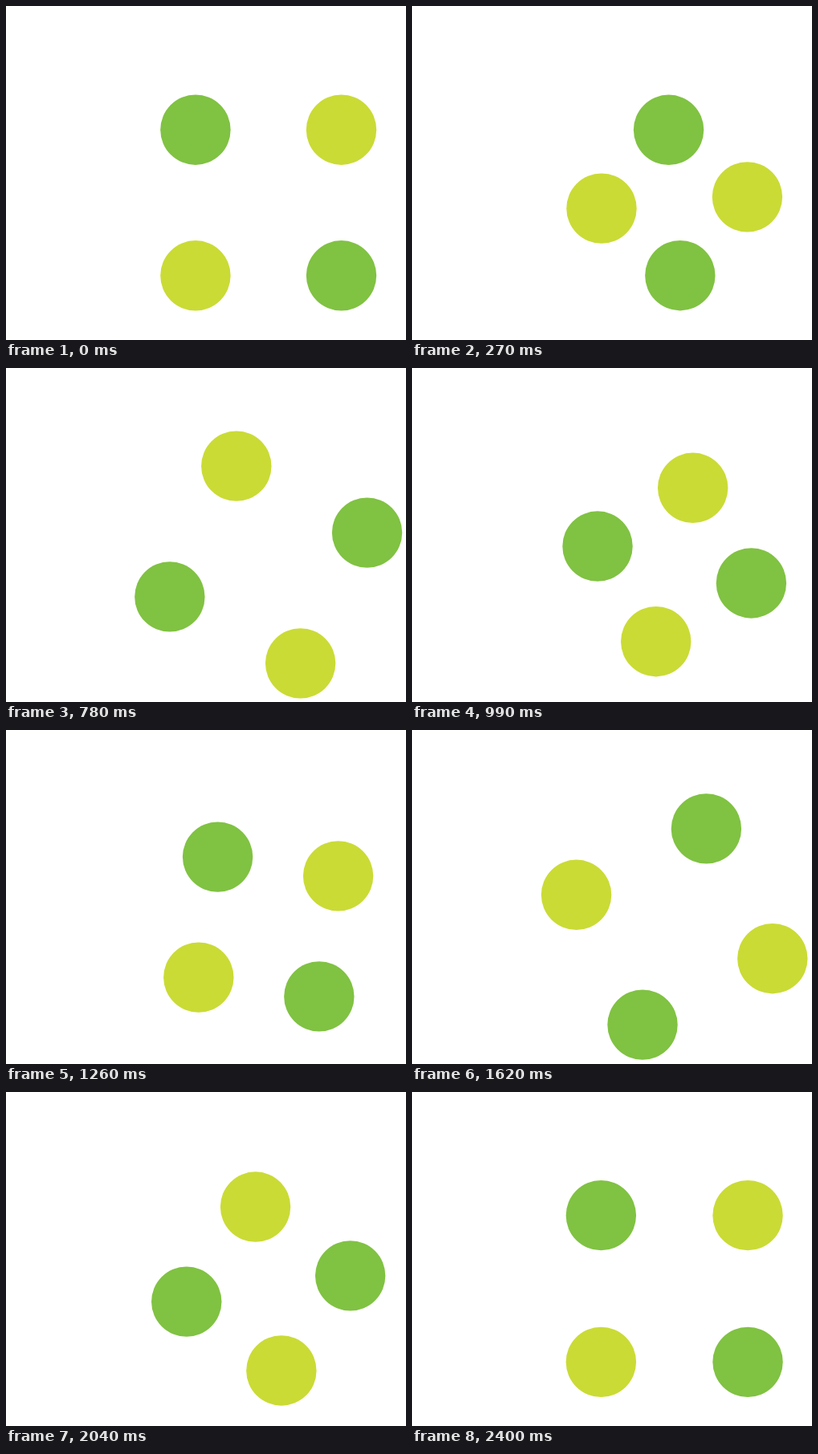
An HTML page that plays this animation: 498 px wide and 416 px high, repeating every 2.43 s.

```html
<!DOCTYPE html>
<html lang="en">
<head>
<meta charset="utf-8">
<title>Four orbiting dots</title>
<style>
  html, body { margin: 0; width: 100%; height: 100%; overflow: hidden; background: #fff; }
  svg { display: block; width: 498px; height: 416px; }
</style>
</head>
<body>
<svg id="stage" viewBox="0 0 498 416"></svg>
<script>
const STEP = 30, STEPS = 81, PULSE = 27;
const CENTER = { x: 326.7, y: 245 };
const DOT = 43.7;
const COLORS = ['#80c242', '#cadb35'];

// Orbit radius through one pulse, a knot every three steps.
const KNOTS = [128.4, 116.5, 98.4, 91, 95.3, 107.4, 117.4, 124.4, 127.6];
const GAP = PULSE / KNOTS.length;

const stage = document.getElementById('stage');
const dots = [0, 1, 2, 3].map(i => {
  const dot = document.createElementNS('http://www.w3.org/2000/svg', 'circle');
  dot.setAttribute('r', DOT);
  dot.setAttribute('fill', COLORS[i % 2]);
  return stage.appendChild(dot);
});

// Closed Catmull-Rom curve through the knots.
function orbit(step) {
  const u = (step % PULSE) / GAP, i = Math.floor(u), t = u - i;
  const at = k => KNOTS[(i + k + KNOTS.length) % KNOTS.length];
  const [a, b, c, d] = [at(-1), at(0), at(1), at(2)];
  return b + t / 2 * (c - a + t * (2 * a - 5 * b + 4 * c - d + t * (3 * (b - c) + d - a)));
}

function draw(step) {
  const r = orbit(step);
  const turn = step / (STEPS - 1) * 2 * Math.PI;
  dots.forEach((dot, i) => {
    const angle = turn + (i - 1.5) * Math.PI / 2;
    dot.setAttribute('cx', CENTER.x + r * Math.cos(angle));
    dot.setAttribute('cy', CENTER.y + r * Math.sin(angle));
  });
}

const start = performance.now();
function tick() {
  const elapsed = Math.max(0, performance.now() - start);
  draw(Math.floor(elapsed / STEP) % STEPS);
  requestAnimationFrame(tick);
}
draw(0);
requestAnimationFrame(tick);
</script>
</body>
</html>
```
